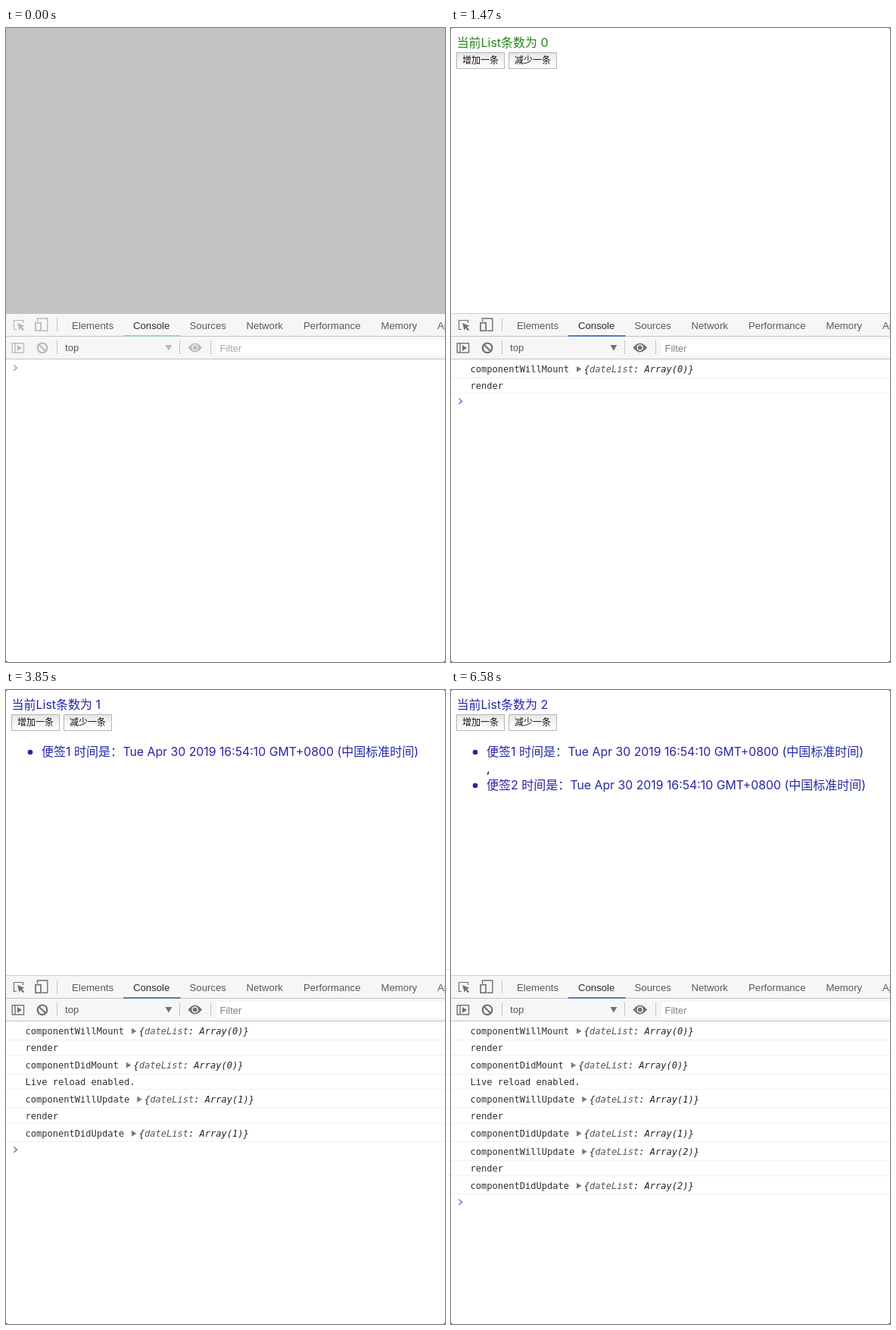
An HTML page for the animation above (7 s loop, 580 by 836 pixels).

```html
<!DOCTYPE html>
<html lang="zh-CN">
<head>
<meta charset="utf-8">
<title>Component lifecycle in the console</title>
<style>
  html, body { margin: 0; width: 100%; height: 100%; overflow: hidden; background: #fff; }
  svg { display: block; width: 580px; height: 836px; }
  text { white-space: pre; }
  .page { font: 16px Inter, "Noto Sans CJK SC", "Noto Sans CJK", sans-serif; }
  .date { font-size: 15.8px; }
  .button { font: 12px "Noto Sans CJK SC", "Noto Sans CJK", sans-serif; fill: #111; }
  .ui { font: 13.2px "Liberation Sans", Arial, sans-serif; fill: #5a5a5a; }
  .log { font: 12.05px "DejaVu Sans Mono", monospace; fill: #303030; }
  .value { font-style: italic; fill: #222; }
  .key { fill: #565656; }
</style>
</head>
<body>
<svg id="stage" viewBox="0 0 580 836" xmlns="http://www.w3.org/2000/svg">
  <defs>
    <linearGradient id="idle" x2="0" y2="1">
      <stop offset="0" stop-color="#e6e6e6"/><stop offset=".45" stop-color="#f4f4f4"/><stop offset="1" stop-color="#fff"/>
    </linearGradient>
    <linearGradient id="pressed" x2="0" y2="1">
      <stop offset="0" stop-color="#c4c4c4"/><stop offset="1" stop-color="#dedede"/>
    </linearGradient>
  </defs>
  <rect width="580" height="836" fill="#fff"/>
  <g id="page"></g>
  <rect id="veil" width="580" height="377" fill="#c3c3c3"/>

  <rect y="377" width="580" height="60" fill="#f6f6f6"/>
  <rect x="278" y="411" width="302" height="21" fill="#fff"/>
  <path d="M0 406.5H580M0 436.5H580" stroke="#c3c3c3"/>
  <path id="topEdge" d="M0 376.5H580" stroke="#cecece"/>
  <path d="M67.5 383v17M67.5 412v18M229.5 412v18M270.5 412v18" stroke="#c4c4c4"/>
  <g id="tabs" class="ui"></g>
  <rect id="underline" x="155" y="405" width="75.5" height="2"/>
  <text class="ui" x="78" y="426">top</text>
  <text class="ui" id="filter" x="282.5" y="427" style="font-size:13px">Filter</text>
  <g id="icons" fill="none" stroke="currentColor">
    <path d="M14 397.5H10.500V385.500H22.500V389" stroke-width="1.2"/>
    <path d="M15 389l9.500 3.800-3.600 1.500 3.300 3.500-1.600 1.500-3.400-3.500-1.500 3.200z" fill="currentColor" stroke="none"/>
    <path d="M41.500 387V383H54.800V399.300H47.500" stroke-width="1.400"/>
    <rect x="39" y="388.700" width="7" height="10.500" stroke-width="1.700"/>
    <rect x="8.200" y="415.700" width="15.300" height="12.300" stroke-width="1.400"/>
    <path d="M12 416v12" stroke-width="1.400"/>
    <path d="M15 418l6 3.900-6 3.900z" fill="currentColor" stroke="none"/>
    <circle cx="48" cy="421.800" r="6.300" stroke-width="2.200"/>
    <path d="M43.600 417.500l8.800 8.700" stroke-width="2.200"/>
    <path d="M210.500 418h8.800l-4.400 7.500z" fill="currentColor" stroke="none"/>
    <path d="M240.500 421.500Q249.700 409.500 259 421.500Q249.700 433.500 240.500 421.500z" fill="currentColor" stroke="none"/>
    <circle cx="249.700" cy="421.500" r="3.600" fill="currentColor" stroke="#f6f6f6" stroke-width="1.500"/>
  </g>

  <g id="console"></g>
  <path id="prompt" d="M10.300 -3.500l4 3.700-4 3.700" fill="none" stroke-width="1.700"/>
  <path d="M0 833v3h3Q0 836 0 833zM580 833v3h-3Q580 836 580 833z" fill="#333"/>
  <path id="corners" d="M0 2V0H2Q0 0 0 2zM580 2V0H578Q580 0 580 2z" fill="#333"/>
</svg>
<script>
const LOOP = 7000;
const OPEN = 1470, MOUNTED = 1540;
const PRESSES = [[3710, 3850], [4690, 4830]];
const GREEN = '#27821c', BLUE = '#2626a5';
const OBJECT_ROW = 24.4, PLAIN_ROW = 20.4, CONSOLE_TOP = 437, CHAR = 7.25;
const DATE = 'Tue Apr 30 2019 16:54:10 GMT+0800';

const get = id => document.getElementById(id);
const label = (x, y, content, cls, attrs = '') =>
  `<text x="${x}" y="${y}" class="${cls}" ${attrs}>${content}</text>`;

const updates = n => [['componentWillUpdate', n], ['render'], ['componentDidUpdate', n]];
const LOGS = [
  ['componentWillMount', 0], ['render'],
  ['componentDidMount', 0], ['Live reload enabled.'],
  ...updates(1), ...updates(2)
];

function button(x, caption, isPressed) {
  return `<rect x="${x + .5}" y="32.5" width="63" height="21" fill="url(#${isPressed ? 'pressed' : 'idle'})" stroke="#b4b4b4"/>` +
    label(x + 8, 47, caption, 'button');
}

function note(n) {
  const y = 87 + (n - 1) * 44, shift = (n - 1) * 3;
  return `<circle cx="32" cy="${y - 5}" r="3.3" fill="${BLUE}"/>` +
    label(47, y, `便签${n} 时间是：`, 'page', `fill="${BLUE}"`) +
    label(154.500 + shift, y, DATE, 'page date', `fill="${BLUE}"`) +
    label(437.500 + shift, y, '(中国标准时间)', 'page', `fill="${BLUE}"`);
}

function drawPage(count, isPressed) {
  let out = label(7.5, 25, `当前List条数为 ${count}`, 'page', `fill="${count ? BLUE : GREEN}"`) +
    button(7, '增加一条', isPressed) + button(76, '减少一条', false);
  for (let n = 1; n <= count; n++) out += note(n);
  if (count > 1) out += label(47, 109, ',', 'page', 'fill="#111"');
  return out;
}

function drawConsole(rowCount) {
  let y = CONSOLE_TOP, out = '';
  for (const [message, size] of LOGS.slice(0, rowCount)) {
    const hasObject = size !== undefined;
    const baseline = Math.round(y + (hasObject ? 17.2 : 14.8));
    out += label(25.5, baseline, message, 'log');
    if (hasObject) {
      const end = 25.5 + message.length * CHAR;
      out += `<path d="M${end + 10} ${baseline - 8.2}l6.500 4-6.500 4z" fill="#7c7c7c"/>` +
        label(end + 19.8, baseline, `{<tspan class="key">dateList</tspan>: Array(${size})}`, 'log value');
    }
    y += hasObject ? OBJECT_ROW : PLAIN_ROW;
    out += `<path d="M0 ${Math.floor(y) + .5}H580" stroke="#f0f0f0"/>`;
  }
  return { out, end: y };
}

function stateAt(t) {
  const count = PRESSES.filter(([, release]) => t >= release).length;
  return {
    isOpen: t >= OPEN,
    count,
    isPressed: PRESSES.some(([down, release]) => t >= down && t < release),
    rowCount: t < OPEN ? 0 : t < MOUNTED ? 2 : 4 + count * 3
  };
}

let shown = '';
function render(t) {
  const state = stateAt(t), key = JSON.stringify(state);
  if (key === shown) return;
  shown = key;
  const { isOpen, count, isPressed, rowCount } = state;
  const log = drawConsole(rowCount);
  get('page').innerHTML = isOpen ? drawPage(count, isPressed) : '';
  get('console').innerHTML = log.out;
  get('prompt').setAttribute('transform', `translate(0 ${Math.round(log.end + 10.5)})`);
  get('prompt').setAttribute('stroke', isOpen ? '#6c8cc8' : '#a9a9a9');
  get('underline').setAttribute('fill', isOpen ? '#4f7fb5' : '#a5cad0');
  get('icons').style.color = isOpen ? '#717171' : '#b9b9b9';
  get('filter').style.fill = isOpen ? '#808080' : '#a8a8a8';
  for (const id of ['topEdge', 'corners']) get(id).style.display = isOpen ? '' : 'none';
  get('veil').style.display = isOpen ? 'none' : '';
}

get('tabs').innerHTML = [
  [87, 'Elements'], [168, 'Console'], [242.5, 'Sources'], [317.5, 'Network'],
  [393, 'Performance'], [495.5, 'Memory'], [570, 'Application']
].map(([x, name]) => label(x, 397, name, 'ui', name === 'Console' ? 'style="fill:#2e2e2e"' : '')).join('');

const start = performance.now();
function tick() {
  render((performance.now() - start) % LOOP);
  requestAnimationFrame(tick);
}
render(0);
tick();
</script>
</body>
</html>
```
